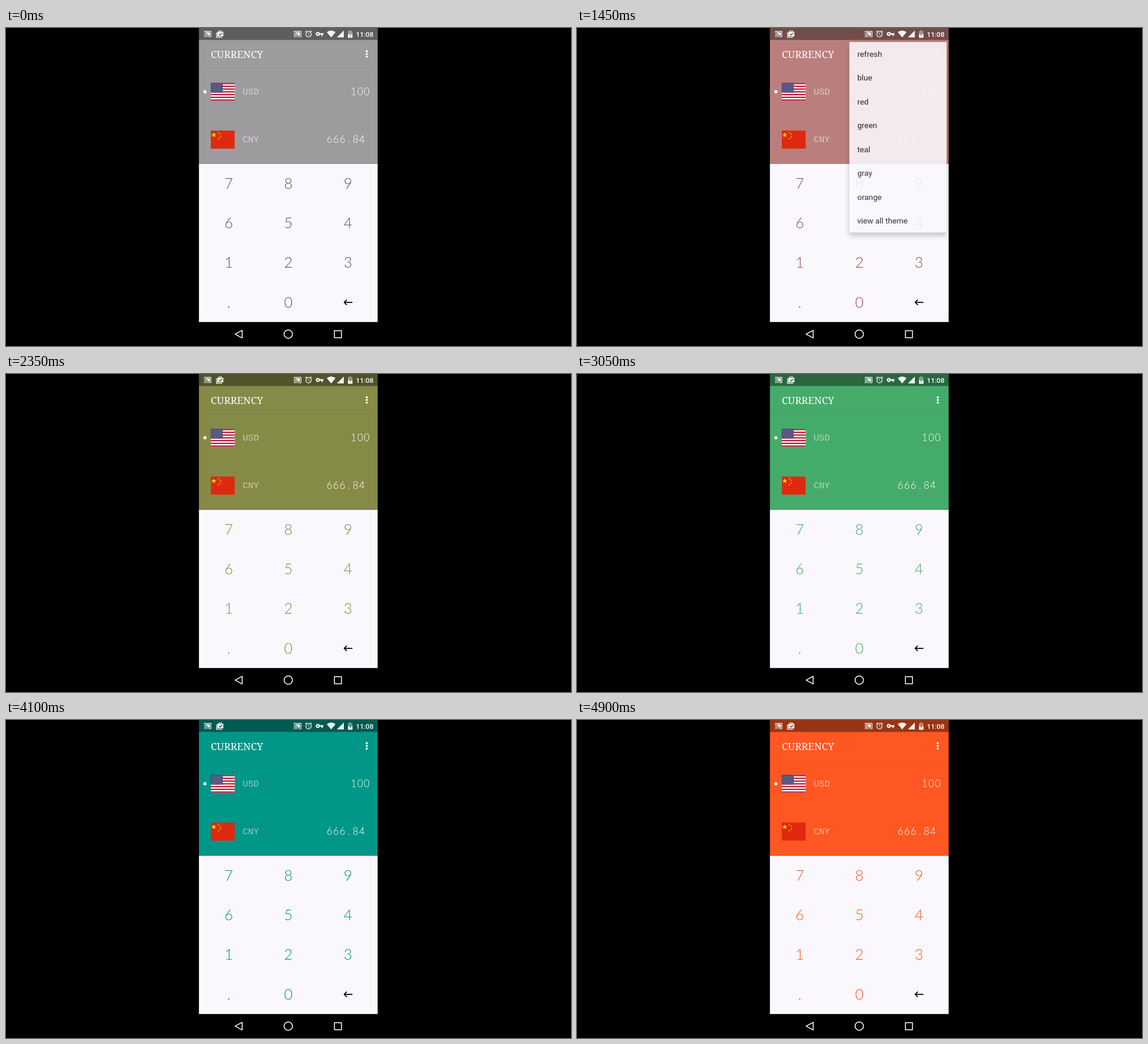
Animation, 960 px wide and 540 px high, one loop 4.95 s. Source, as an HTML page:

```html
<!DOCTYPE html>
<html lang="en">
<head>
<meta charset="utf-8">
<title>Currency themes</title>
<style>
  html, body { margin: 0; width: 100%; height: 100%; overflow: hidden; background: #000; }
  svg { display: block; width: 960px; height: 540px; --theme: #9e9b9e; --key: #5c5a5c; }
  #title { font: 16.875px "Noto Serif", serif; }
  #clock { font: 500 11.8px Roboto, sans-serif; text-anchor: end; }
  .code { font: 15.5px "Liberation Mono", monospace; fill-opacity: .55; }
  .amount { font: 300 16.8px Lato, sans-serif; text-anchor: middle; }
  .key { font: 300 25px Lato, sans-serif; text-anchor: middle; fill: var(--key); }
  #items text { font: 13.5px Roboto, sans-serif; fill: #1c1b1c; }
  #menu { filter: drop-shadow(0 5px 5px rgba(0, 0, 0, .25)); }
</style>
</head>
<body>
<svg id="stage" viewBox="0 0 960 540" fill="#fff">
  <defs>
    <path id="cast" d="M21 3H3c-1.1 0-2 .9-2 2v3h2V5h18v14h-7v2h7c1.1 0 2-.9 2-2V5c0-1.1-.9-2-2-2zM1 18v3h3c0-1.66-1.34-3-3-3zm0-4v2c2.76 0 5 2.24 5 5h2c0-3.87-3.13-7-7-7zm0-4v2c4.97 0 9 4.03 9 9h2c0-6.08-4.93-11-11-11zM19 7H5v1.63c3.96 1.28 7.09 4.41 8.37 8.37H19V7z"/>
    <clipPath id="reveal"><rect id="window" rx="2"/></clipPath>
  </defs>

  <rect x="327.8" width="303.7" height="230.5" fill="var(--theme)"/>
  <rect x="327.8" width="303.7" height="20.3" fill-opacity=".4" fill="#000"/>
  <rect x="327.8" y="67.5" width="303.7" height="1" fill-opacity=".04" fill="#000"/>
  <rect x="327.8" y="230.3" width="303.7" height="269" fill="#faf8fc"/>
  <rect x="327.8" y="229.6" width="303.7" height="1" fill-opacity=".25" fill="#000"/>

  <!-- status bar -->
  <g fill-opacity=".93">
    <use href="#cast" transform="translate(336 3.4) scale(.56)"/>
    <use href="#cast" transform="translate(488.4 3.2) scale(.59)"/>
    <path d="M357 7.5h1.3v7.7h9v1.3H357zM359 6.2h2.3V4.3h5.4v1.9h2.6v8H359zm3.4 0h3.2v-.9h-3.2zm.1 3.6-.9.9 2.2 2.2 4-4-.9-.9-3.1 3.1z" fill-rule="evenodd"/>
    <path transform="translate(507.1 3) scale(.58)" d="M22 5.72l-4.6-3.86-1.29 1.53 4.6 3.86L22 5.72zM7.88 3.39L6.6 1.86 2 5.71l1.29 1.53 4.59-3.85zM12.5 8H11v6l4.75 2.85.75-1.23-4-2.37V8zM12 4c-4.97 0-9 4.03-9 9s4.02 9 9 9c4.97 0 9-4.03 9-9s-4.03-9-9-9zm0 16c-3.87 0-7-3.13-7-7s3.13-7 7-7 7 3.13 7 7-3.13 7-7 7z"/>
    <path transform="translate(525.6 2.8) scale(.6)" d="M12.65 10C11.83 7.67 9.61 6 7 6c-3.31 0-6 2.69-6 6s2.69 6 6 6c2.61 0 4.83-1.67 5.65-4H17v4h4v-4h2v-4H12.65zM7 14c-1.1 0-2-.9-2-2s.9-2 2-2 2 .9 2 2-.9 2-2 2z"/>
    <path d="M545 7Q552.5 1.4 560 7L552.5 16zM574 4.2V16H562.2z"/>
    <path d="M583.2 4h3.2v1.3h2.2V16.5h-7.6V5.3h2.2z" fill-opacity=".4"/>
    <path d="M581 10.5h7.6v6H581z"/>
    <path d="M585.4 7l-2.6 4.6h1.6v3.4l2.6-4.8h-1.6z" fill="var(--theme)"/>
  </g>
  <text id="clock" x="624.5" y="14.6">11:08</text>

  <text id="title" x="348" y="50.6">CURRENCY</text>
  <circle cx="613" cy="39.4" r="1.8"/><circle cx="613" cy="44.1" r="1.8"/><circle cx="613" cy="48.8" r="1.8"/>

  <circle cx="338" cy="108.3" r="2.7"/>
  <g id="usa"><rect x="348" y="93.2" width="40.5" height="30.4"/></g>
  <g id="china"><rect x="348" y="174.2" width="40.5" height="30.6" fill="#de2910"/></g>
  <text class="code" x="402" y="113.3">USD</text>
  <text class="code" x="402" y="194.3">CNY</text>
  <g id="digits"></g>
  <path transform="translate(570.9 455.7) scale(.844)" fill="#000" d="M21 11H6.83l3.58-3.59L9 6l-6 6 6 6 1.41-1.41L6.83 13H21z"/>

  <g fill="none" stroke="#fff" stroke-width="1.5" stroke-linejoin="round">
    <path d="M401.3 513.3v13L389.3 519.8z"/>
    <circle cx="479.6" cy="519.8" r="7.1"/>
    <rect x="558" y="514" width="12" height="12"/>
  </g>

  <g id="menu"><g clip-path="url(#reveal)"><g id="items">
    <rect x="462.5" y="23.6" width="165.7" height="324" rx="2" fill="#faf8fc"/>
  </g></g></g>
</svg>

<script>
const LOOP = 4950, STEP = 50;
const BOX = { x: 462.5, y: 23.6, w: 165.7, h: 324 };
const DOTS = { x: 613, y: 44 };
const GRAY = [158, 155, 158], DARK_GRAY = [92, 90, 92];
const THEMES = [
  { start: 1335, color: [244, 67, 54] },
  { start: 2170, color: [76, 175, 80] },
  { start: 2970, color: [33, 150, 243] },
  { start: 3800, color: [0, 150, 136] },
  { start: 4570, color: [255, 87, 34] },
];

const $ = id => document.getElementById(id);

function add(parent, tag, attrs, text = '') {
  const node = document.createElementNS('http://www.w3.org/2000/svg', tag);
  for (const name in attrs) node.setAttribute(name, attrs[name]);
  node.textContent = text;
  $(parent).append(node);
}

function star(parent, x, y, r, fill, turn = 0) {
  const points = Array.from({ length: 10 }, (_, i) => {
    const a = turn + i * Math.PI / 5, d = i % 2 ? r * .4 : r;
    return [x + d * Math.sin(a), y - d * Math.cos(a)].map(v => v.toFixed(2));
  });
  add(parent, 'polygon', { points: points.join(' '), fill });
}

function buildFlags() {
  const stripe = 30.4 / 13;
  for (let i = 0; i < 13; i += 2)
    add('usa', 'rect', { x: 348, y: 93.2 + i * stripe, width: 40.5, height: stripe, fill: '#b8203c' });
  add('usa', 'rect', { x: 348, y: 93.2, width: 20.2, height: stripe * 7, fill: '#3c3b6e' });
  for (let row = 0; row < 9; row++)
    for (let col = row % 2; col < 11; col += 2)
      star('usa', 349.7 + col * 1.68, 94.9 + row * 1.62, .85, '#fff');

  star('china', 353, 181.7, 4.5, '#ffde00');
  [[361, 177.6], [364.2, 180.6], [364.2, 185], [361, 188]].forEach(([x, y], i) =>
    star('china', x, y, 1.6, '#ffde00', .4 + i * .3));
}

function buildText() {
  const spaced = (text, x, y) => [...text].forEach((c, i) =>
    add('digits', 'text', { class: 'amount', x: x + i * 11.05, y }, c));
  spaced('100', 590.7, 114);
  spaced('666.84', 549.6, 195);

  ['789', '654', '123', '.0'].forEach((row, r) => [...row].forEach((c, i) =>
    add('digits', 'text', { class: 'key', x: 378.5 + i * 101.2, y: 272.6 + r * 67.3 }, c)));

  ['refresh', 'blue', 'red', 'green', 'teal', 'gray', 'orange', 'view all theme'].forEach((label, i) =>
    add('items', 'text', { x: 476.2, y: 48.9 + i * 40.5 }, label));
}

const progress = (t, start, length) => Math.min(1, Math.max(0, (t - start) / length));
const smooth = p => (1 - Math.cos(Math.PI * p)) / 2;
const lerp = (a, b, p) => a + (b - a) * p;

// Blend through every theme change that has begun by time t.
function themeColor(t, first) {
  return THEMES.reduce((now, { start, color }) => {
    const p = smooth(progress(t, start, 300));
    return now.map((v, i) => lerp(v, color[i], p));
  }, first);
}

function drawMenu(t) {
  const open = 1 - (1 - progress(t, 450, 250)) ** 3;
  const alpha = progress(t, 450, 100) * (1 - smooth(progress(t, 1384, 300)));
  const w = BOX.w * open, h = BOX.h * open;
  const cx = BOX.x + BOX.w / 2, cy = BOX.y + BOX.h / 2;
  const x = lerp(DOTS.x, cx, open), y = lerp(DOTS.y, cy, open);
  const pane = { x: x - w / 2, y: y - h / 2, width: w, height: h };
  for (const name in pane) $('window').setAttribute(name, pane[name]);
  $('items').setAttribute('transform', `translate(${x - cx} ${y - cy})`);
  $('menu').style.opacity = alpha;
  $('menu').style.display = alpha > 0 ? '' : 'none';
}

function draw(now) {
  const t = Math.floor(now % LOOP / STEP) * STEP;
  const style = $('stage').style;
  style.setProperty('--theme', `rgb(${themeColor(t, GRAY).map(Math.round)})`);
  style.setProperty('--key', `rgb(${themeColor(t, DARK_GRAY).map(Math.round)})`);
  drawMenu(t);
}

buildFlags();
buildText();
const begin = performance.now();
function tick() {
  draw(performance.now() - begin);
  requestAnimationFrame(tick);
}
tick();
</script>
</body>
</html>
```
